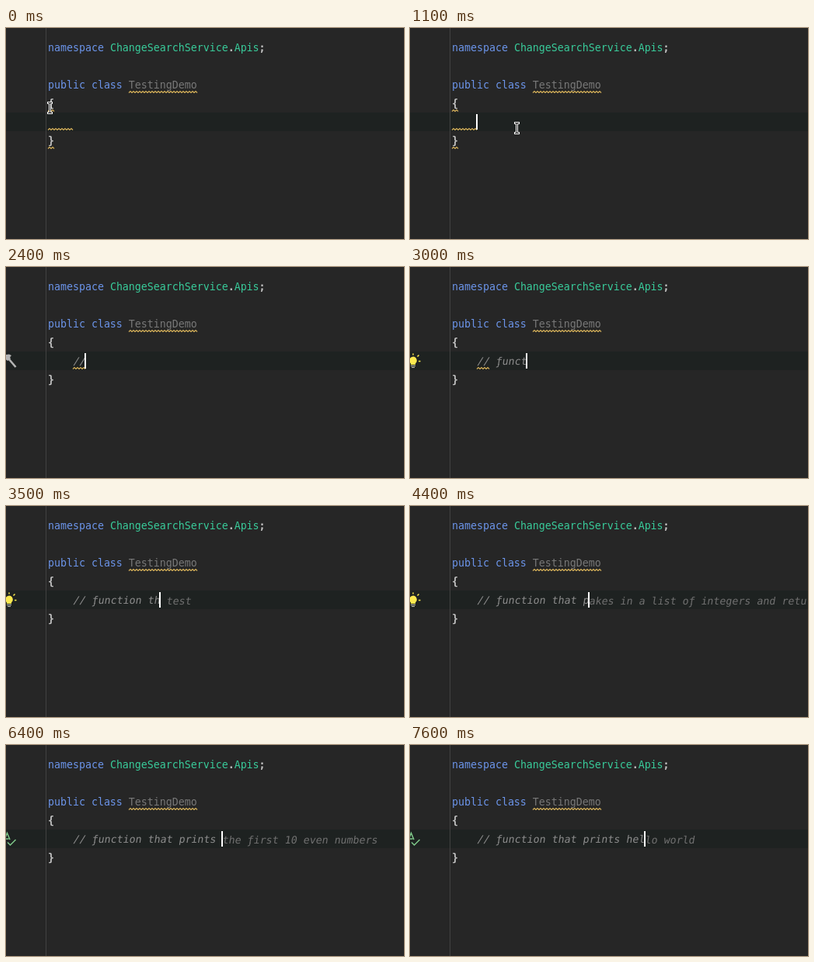
These frames come from a looping animation (512x272 px, 8 s). An HTML page:

```html
<!DOCTYPE html>
<html lang="en">
<head>
<meta charset="utf-8">
<title>Code completion</title>
<style>
  html, body { margin: 0; width: 100%; height: 100%; overflow: hidden; background: #262626; }
  svg { display: block; width: 512px; height: 272px; }
  text { font: 13.288px "DejaVu Sans Mono", "Noto Sans Mono", monospace; white-space: pre; fill: #c4c4c4; }
  .bold { font-weight: bold; }
  .key { fill: #6c95eb; }
  .type { fill: #39cc9b; }
  .unused { fill: #787878; }
  #typed { fill: #8c8c8c; stroke: #8c8c8c; }
  #ghost { fill: #707070; stroke: #707070; }
  #typed text, #ghost text { fill: inherit; stroke: none; }
  .tail { fill: none; stroke-width: 1.1; }
  .wave { fill: none; stroke: #d8b25a; stroke-width: 1.2; }
</style>
</head>
<body>
<svg viewBox="0 0 512 272">
  <defs>
    <path id="beam" d="M1.500 1.500H5.500M3.500 1.500V14.500M1.500 14.500H5.500"/>
  </defs>
  <rect width="512" height="272" fill="#262626"/>
  <rect y="109" width="512" height="24" fill="#1e2221"/>
  <rect x="51" width="1" height="272" fill="#414141"/>

  <text x="54" y="30"><tspan class="key">namespace</tspan> <tspan class="type">ChangeSearchService</tspan><tspan class="bold">.</tspan><tspan class="type">Apis</tspan><tspan class="bold">;</tspan></text>
  <text x="54" y="78"><tspan class="key">public class</tspan> <tspan class="unused">TestingDemo</tspan></text>
  <text class="bold" x="54" y="102">{</text>
  <text class="bold" x="54" y="150">}</text>

  <path class="wave" id="nameWave"/>
  <path class="wave" id="openWave"/>
  <path class="wave" id="closeWave"/>
  <path class="wave" id="lineWave"/>

  <g id="typed"><text></text><path class="tail"/></g>
  <g id="ghost"><text></text><path class="tail"/></g>
  <rect id="caret" y="111" width="2" height="20" fill="#fff"/>

  <g id="hammer" fill="#b4b4b4">
    <path d="M0 113L4 112.500L7 114L5 116.500L6 118L2.500 121L0 119.500Z"/>
    <path d="M4 119L12.500 129" stroke="#b4b4b4" stroke-width="2.600"/>
  </g>
  <g id="bulb" fill="#fce94f">
    <path d="M4 115.500a5 5 0 0 1 3 8.800V126H1V124.300A5 5 0 0 1 4 115.500Z"/>
    <path d="M1 127.500H7M2 129.500H6" stroke="#c9c9b8"/>
    <path d="M4 111.500V113.500M9.500 115.500L11.500 113.500M11 121.500H13.500" stroke="#fce94f" stroke-width="1.500"/>
  </g>
  <g id="check" fill="none" stroke="#7fc98a" stroke-width="1.500">
    <path d="M-3 124.500L1.500 113.500L5 122M-1 121H3.500"/>
    <path d="M2 125.500L5.500 129L12.500 122"/>
  </g>

  <g id="mouse" fill="none" stroke-linecap="square">
    <use href="#beam" stroke="#fff" stroke-width="3"/>
    <use href="#beam" stroke="#111"/>
  </g>
</svg>
<script>
const LOOP = 8000, STEP = 100, CELL = 8, LEFT = 86;

// Bursts of typing: start, ms per key, text
const bursts = [
  [1900, 100, '//'], [2500, 75, ' func'], [3000, 83, 'tion th'], [3700, 1, 'at'],
  [4200, 200, ' p'], [4500, 100, 'rin'], [5700, 200, 'ts'], [6300, 200, ' hel']
];

// Suggestions: start, end, text; keys typed meanwhile cover the beginning
const hints = [
  [3500, 3700, 'to test'],
  [4400, 4500, 'takes in a list of integers and returns'],
  [5300, 6500, 'ts the first 10 even numbers'],
  [7600, LOOP, 'lo world']
];

const $ = id => document.getElementById(id);
const show = (id, on) => $(id).setAttribute('display', on ? 'inline' : 'none');
const mix = (a, b, k) => Math.round(a + (b - a) * k);

function ease(t, from, to) {
  const k = Math.min(1, Math.max(0, (t - from) / (to - from)));
  return k * k * (3 - 2 * k);
}

function typedAt(t) {
  return bursts.map(([start, pace, text]) =>
    t < start ? '' : text.slice(0, Math.floor((t - start) / pace) + 1)).join('');
}

function wave(id, x, y, width) {
  let d = `M${x} ${y + 2.5}`;
  for (let i = 2; i <= width; i += 2) d += `L${x + i} ${y + (i % 4 ? 0.5 : 2.5)}`;
  $(id).setAttribute('d', d);
}

// Slanted text; each f gets a descending tail
function italic(id, x, baseline, str) {
  const [text, tail] = $(id).children;
  $(id).setAttribute('transform', `translate(${x} ${baseline}) skewX(-9)`);
  text.textContent = str;
  const tails = [...str].map((c, i) =>
    c === 'f' ? `M${i * CELL + 3.9} -1V1q0 2 -2 2h-.6` : '');
  tail.setAttribute('d', tails.join(''));
}

function draw(t) {
  const typed = typedAt(t);
  const x = LEFT + typed.length * CELL;
  const hint = hints.find(([start, end]) => t >= start && t < end);
  const covered = hint ? typed.length - typedAt(hint[0] - STEP).length : 0;

  italic('typed', LEFT, 126, typed);
  italic('ghost', x, 127, hint ? hint[2].slice(covered) : '');

  $('caret').setAttribute('x', x - 1);
  show('caret', t >= 1000);

  show('openWave', t < 2400);
  show('closeWave', t < 2400);
  show('lineWave', t < 3300);
  if (t < 2100) wave('lineWave', 54, 129, 32);
  else wave('lineWave', LEFT, 129, 16);

  show('hammer', t >= 1300 && t < 2600);
  show('bulb', t >= 2600 && t < 6400);
  show('check', t >= 6400);

  // The pointer glides into the line, then drifts back a little
  const glide = ease(t, 500, 1100), drift = 4 * ease(t, 1100, 1500);
  const mouseX = mix(53, 134, glide) - drift, mouseY = mix(95, 121, glide) - drift;
  $('mouse').setAttribute('transform', `translate(${mouseX} ${mouseY})`);
  show('mouse', t < 1900);
}

wave('nameWave', 158, 81, 88);
wave('openWave', 54, 105, 8);
wave('closeWave', 54, 153, 8);

const start = performance.now();
function tick() {
  const t = (performance.now() - start) % LOOP;
  draw(Math.floor(t / STEP) * STEP);
  requestAnimationFrame(tick);
}
tick();
</script>
</body>
</html>
```
